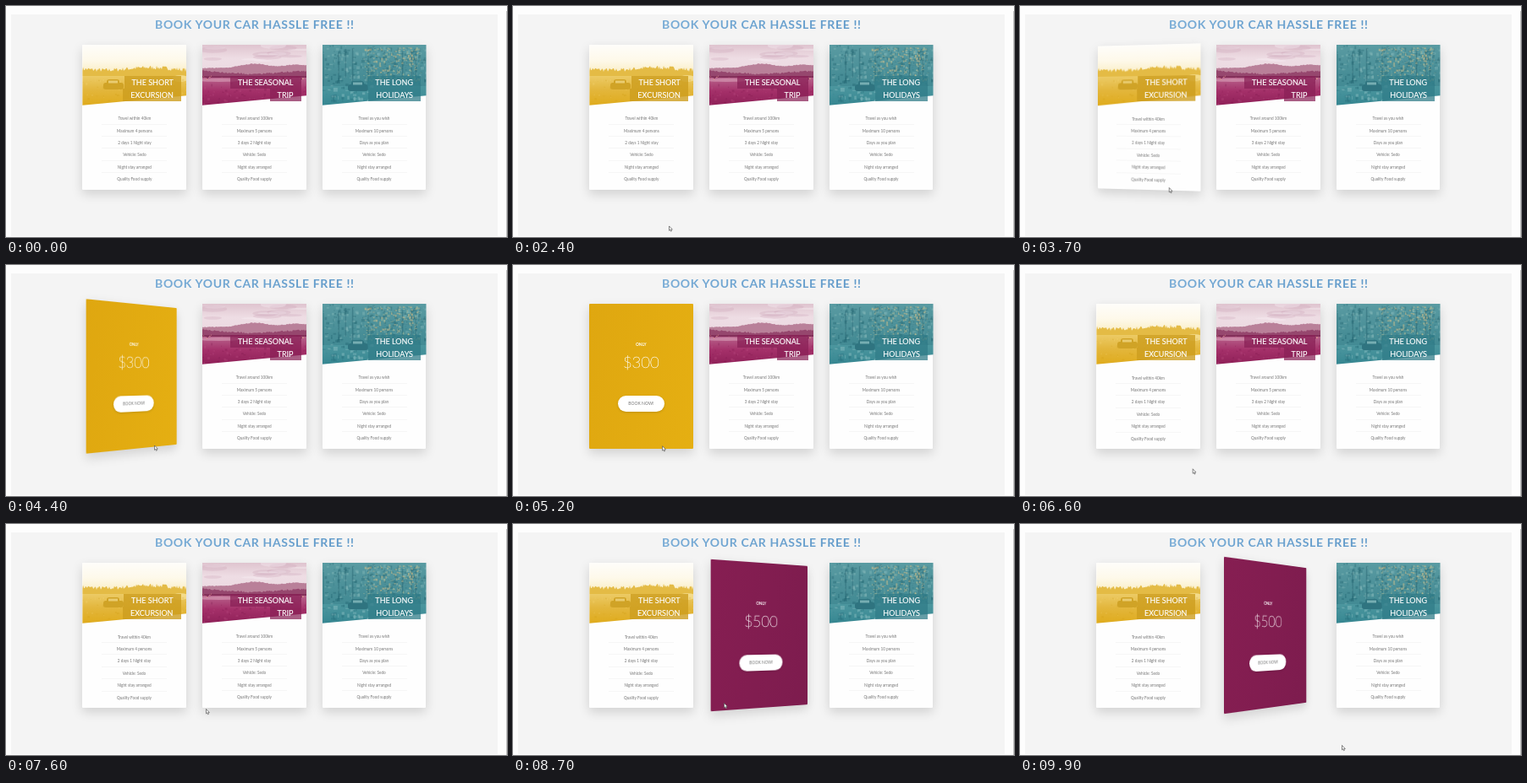
Write an HTML page with a canvas that moves like this. It is 592 by 274 pixels and loops after 10 s.

```html
<!DOCTYPE html>
<html lang="en">
<head>
<meta charset="utf-8">
<title>Book your car</title>
<style>
html, body { margin: 0; width: 100%; height: 100%; overflow: hidden; background: #fdfdfd; }
body { position: relative; font-family: Lato, sans-serif; }
.panel { position: absolute; left: 6px; top: 10px; width: 575px; height: 263px; background: #f4f4f4; }
.edge { position: absolute; left: 591px; top: 6px; width: 1px; height: 268px; background: #c4c4c4; }
h1 {
  position: absolute; left: 176px; top: 12.5px; margin: 0;
  font: 700 14px/18px Lato, sans-serif; letter-spacing: .66px; white-space: nowrap;
  color: transparent; background: linear-gradient(90deg, #79acd6, #5f99c9); -webkit-background-clip: text; background-clip: text;
}
.card { position: absolute; top: 45.7px; width: 122.7px; height: 172px; perspective: 490px; }
.side {
  position: absolute; inset: 0; border-radius: 1px; backface-visibility: hidden;
  box-shadow: 0 5px 13px rgba(0, 0, 0, .15);
}
.front { background: #fefefe; }
canvas { position: absolute; left: 0; top: 0; clip-path: polygon(0 0, 100% 0, 100% 84%, 0 100%); }
h4 {
  position: absolute; right: 6.2px; top: 37.2px; margin: 0; text-align: right;
  font: 400 9px/15px Lato, sans-serif; color: #fff; white-space: nowrap;
  -webkit-text-stroke: .15px #fff;
}
h4 span { padding: 2px 9px 2.3px; -webkit-box-decoration-break: clone; box-decoration-break: clone; background: var(--tint); }
ul { position: absolute; left: 23px; top: 80.6px; width: 77px; margin: 0; padding: 0; list-style: none; }
li {
  height: 14.4px; box-sizing: border-box; border-bottom: 1px solid #f6f6f6; text-align: center;
  font-size: 4.7px; line-height: 14.4px; color: #777; white-space: nowrap;
}
li:last-child { border: 0; }
.back { color: #fff; text-align: center; background: var(--back); }
.back * { position: absolute; left: 0; right: 0; }
.only { top: 45px; font: 700 4.8px/6px Lato, sans-serif; }
.price { top: 58px; font: 100 18.5px/22px Lato, sans-serif; -webkit-text-stroke: .3px #fff; }
.back .btn {
  left: 33.7px; right: 33.7px; top: 109px; height: 18.6px; border-radius: 10px; background: #fff;
  font-size: 5px; line-height: 18.6px; color: #777; box-shadow: 0 1px 3px rgba(0, 0, 0, .15);
}
#cursor { position: absolute; left: 0; top: 0; overflow: visible; }
</style>
</head>
<body>
<div class="panel"></div>
<div class="edge"></div>
<h1>BOOK YOUR CAR HASSLE FREE !!</h1>
<svg id="cursor" width="6" height="9"><path d="M0 0V5.4L1.2 4.4 2 6.3 2.9 5.9 2.2 4.1H3.8Z" fill="#fff" stroke="#555" stroke-width=".7"/></svg>
<script>
const W = 123, H = 72;
let seed = 7;
const rnd = (a = 0, b = 1) => {
  seed = seed * 16807 % 2147483647;
  return a + (b - a) * seed / 2147483647;
};

function fade(c, y, h, ...colors) {
  const g = c.createLinearGradient(0, y, 0, y + h);
  colors.forEach((k, i) => g.addColorStop(i / (colors.length - 1), k));
  c.fillStyle = g;
  c.fillRect(0, y, W, h);
}
function specks(c, n, [x0, x1], [y0, y1], size, colors) {
  for (let i = 0; i < n; i++) {
    c.fillStyle = colors[i % colors.length];
    c.fillRect(rnd(x0, x1), rnd(y0, y1), rnd(.5, size), rnd(.5, size));
  }
}
function ridge(c, color, base, top) {
  c.fillStyle = color;
  c.beginPath();
  c.moveTo(0, base);
  for (let x = 0; x <= W; x++) c.lineTo(x, top(x));
  c.lineTo(W, base);
  c.fill();
}
function blob(c, color, x, y, rx, ry) {
  c.fillStyle = color;
  c.beginPath();
  c.ellipse(x, y, rx, ry, 0, 0, 7);
  c.fill();
}
function car(c, x, y, body, glass) {
  c.fillStyle = body;
  c.beginPath();
  c.roundRect(x, y + 4, 24, 8, 3);
  c.roundRect(x + 4, y, 15, 7, 3);
  c.fill();
  c.fillStyle = glass;
  c.fillRect(x + 6, y + 1.5, 11, 3);
}

function field(c) {
  fade(c, 0, 36, '#fefdfa', '#fef9ea', '#f9ecc0');
  fade(c, 35, 37, '#edcd6a', '#e3b63c', '#dfab1c');
  ridge(c, '#e4bb45', 37, x => 31 + Math.sin(x / 17) * 1.5 - rnd(0, 5));
  blob(c, 'rgba(250,232,165,.6)', 116, 40, 10, 4);
  specks(c, 100, [0, W], [40, 70], 3, ['rgba(200,150,10,.2)', 'rgba(245,215,120,.25)']);
  car(c, 25, 41, '#d0a326', '#e9cc70');
}
function lake(c) {
  fade(c, 0, 32, '#dfc4cf', '#eedde4', '#ecd9e1');
  for (let i = 0; i < 14; i++)
    blob(c, i % 2 ? 'rgba(250,242,246,.35)' : 'rgba(190,140,165,.2)', rnd(0, W), rnd(0, 20), rnd(8, 18), rnd(1, 4));
  ridge(c, '#b98099', 40, x => 27 - 5 * Math.exp(-(((x - 62) / 22) ** 2)) - 4 * Math.exp(-(((x - 112) / 20) ** 2)) + rnd(0, 1));
  ridge(c, '#96476e', 40, x => 34 - 4 * Math.abs(x / 61 - 1) + rnd(0, 2));
  fade(c, 38, 34, '#b9668e', '#a43069', '#8f2058');
  c.fillStyle = '#84305a';
  c.fillRect(0, 37, W, 2);
  blob(c, 'rgba(225,175,195,.5)', 20, 42, 26, 2);
  specks(c, 25, [0, W], [36, 41], 2, ['#d88b8b', '#6f1c46']);
  specks(c, 100, [0, W], [44, 70], 3, ['rgba(110,15,65,.22)', 'rgba(205,100,150,.18)']);
}
function forest(c) {
  fade(c, 0, H, '#5a9ba2', '#478d96', '#3b8791');
  specks(c, 260, [0, W], [0, 48], 4, ['rgba(25,90,102,.3)', 'rgba(140,190,188,.35)']);
  for (let i = 0; i < 8; i++) {
    c.fillStyle = 'rgba(25,85,97,.35)';
    c.fillRect(rnd(0, W), rnd(0, 12), rnd(.6, 1.6), rnd(28, 42));
  }
  specks(c, 320, [48, 116], [3, 42], 3, ['rgba(213,190,135,.5)', 'rgba(175,190,155,.45)', 'rgba(40,105,116,.35)']);
  fade(c, 49, 23, 'rgba(80,155,163,.7)', 'rgba(52,133,144,.9)');
  specks(c, 40, [0, 60], [48, 66], 5, ['rgba(150,198,200,.4)', 'rgba(35,105,117,.35)']);
  car(c, 30, 43, '#2f7480', '#76adb2');
}

const cards = [
  { x: 90.4, paint: field, title: ['THE SHORT', 'EXCURSION'], tint: 'rgba(205,158,30,.8)',
    back: 'linear-gradient(100deg,#dfa710,#e5af12)', price: '$300',
    list: ['Travel within 40km', 'Maximum 4 persons', '2 days 1 Night stay'] },
  { x: 232, paint: lake, title: ['THE SEASONAL', 'TRIP'], tint: 'rgba(138,32,86,.72)',
    back: 'linear-gradient(100deg,#861e52,#7d1c4e)', price: '$500',
    list: ['Travel around 100km', 'Maximum 5 persons', '3 days 2 Night stay'] },
  { x: 373.5, paint: forest, title: ['THE LONG', 'HOLIDAYS'], tint: 'rgba(48,125,136,.75)',
    list: ['Travel as you wish', 'Maximum 10 persons', 'Days as you plan'] }
];
const common = ['Vehicle: Sedo', 'Night stay arranged', 'Quality Food supply'];
const cursor = document.getElementById('cursor');

for (const k of cards) {
  const el = document.createElement('div');
  el.className = 'card';
  el.style.cssText = `left:${k.x}px;--tint:${k.tint};--back:${k.back}`;
  el.innerHTML = `<div class="side front"><canvas width="${W}" height="${H}"></canvas>
    <h4><span>${k.title.join('<br>')}</span></h4>
    <ul>${[...k.list, ...common].map(s => `<li>${s}</li>`).join('')}</ul></div>` +
    (k.price ? `<div class="side back"><div class="only">ONLY</div><div class="price">${k.price}</div>
    <div class="btn">BOOK NOW!</div></div>` : '');
  document.body.insertBefore(el, cursor);
  k.paint(el.querySelector('canvas').getContext('2d'));
  k.front = el.querySelector('.front');
  k.rear = el.querySelector('.back');
}

// CSS "ease" curve
function ease(x) {
  if (x <= 0 || x >= 1) return x <= 0 ? 0 : 1;
  let lo = 0, hi = 1, u;
  for (let i = 0; i < 24; i++) {
    u = (lo + hi) / 2;
    if (.75 * u * (1 - u) + u ** 3 < x) lo = u; else hi = u;
  }
  return .3 * u * (1 - u) ** 2 + 3 * u * u * (1 - u) + u ** 3;
}

// card, start of hover, time to open, end of hover, time to close
const flips = [[0, 3600, 1500, 5728, 800], [1, 8110, 1000, 9770, 800]];

// time, x, y of the pointer tip
const path = [
  [2400, 184.5, 261], [2500, 182.5, 253.5], [3000, 182.5, 253.5], [3600, 177, 217],
  [4000, 174, 211], [4400, 175.5, 214], [5500, 177, 215], [5900, 194.5, 248.5],
  [6300, 194.5, 248.5], [7600, 236.5, 219.5], [7900, 240, 219], [8110, 243, 217],
  [8700, 249.5, 212.5], [9550, 249.5, 212.5], [9900, 380.5, 262.5]
];

function point(t) {
  const i = path.findIndex(p => p[0] > t);
  if (i < 0) return path[path.length - 1].slice(1);
  const [a, b] = [path[i - 1], path[i]], f = (t - a[0]) / (b[0] - a[0]);
  return [1, 2].map(n => a[n] + (b[n] - a[n]) * f);
}

function draw(now) {
  const t = Math.floor(now % 10000 / 100) * 100;
  for (const [i, start, open, end, close] of flips) {
    const turn = 180 * (ease((t - start) / open) - ease((t - end) / close));
    cards[i].front.style.transform = `rotateY(${-turn}deg)`;
    cards[i].rear.style.transform = `rotateY(${180 - turn}deg)`;
  }
  const shown = t >= path[0][0];
  cursor.style.display = shown ? '' : 'none';
  if (shown) {
    const [x, y] = point(t);
    cursor.style.transform = `translate(${x}px,${y}px)`;
  }
  requestAnimationFrame(() => draw(performance.now()));
}
draw(0);
</script>
</body>
</html>
```
